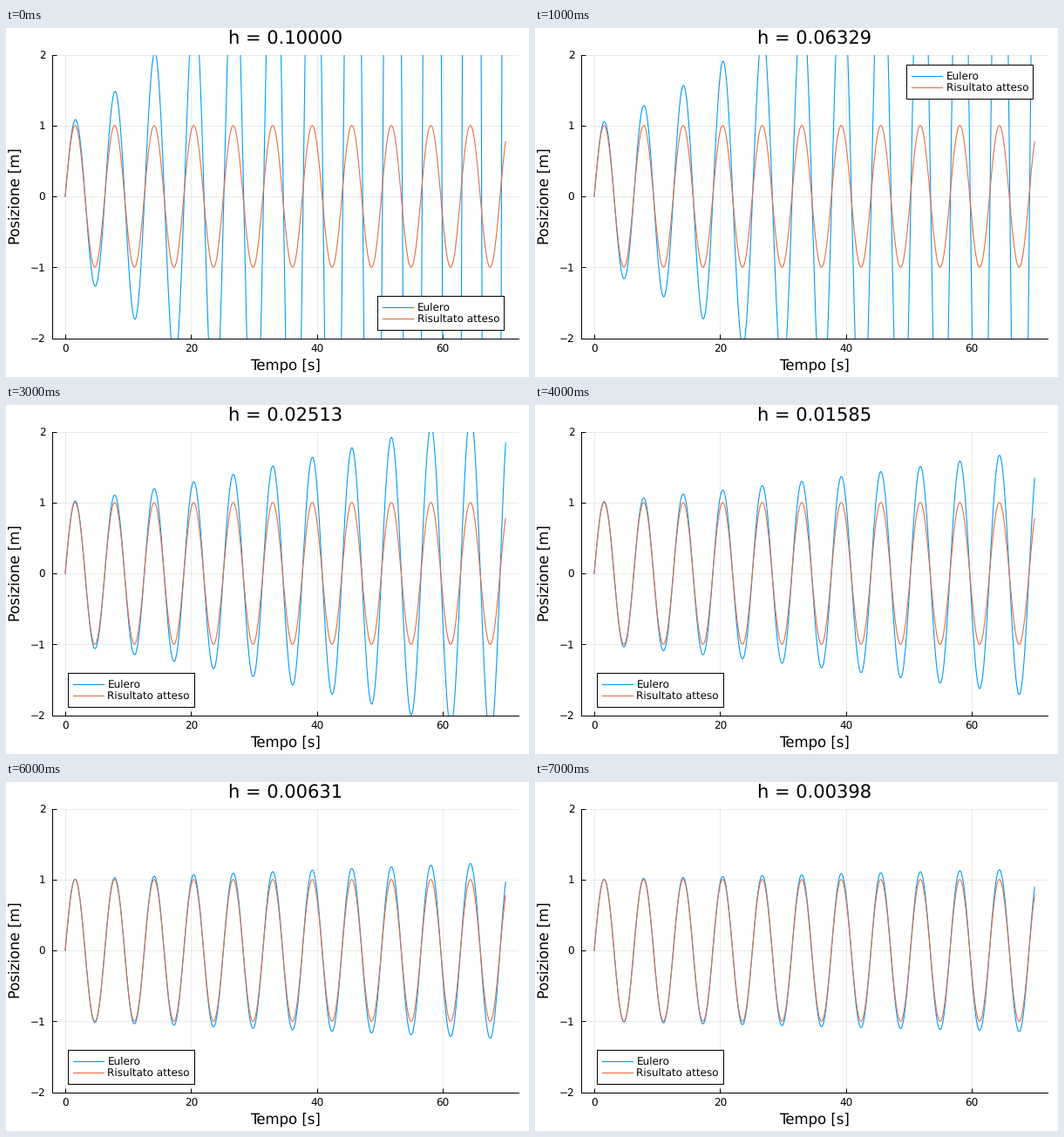
Animation of 600 by 400 pixels, one loop 8 s. Source, as a matplotlib script:

```python
import matplotlib.pyplot as plt
import numpy as np
from matplotlib.animation import FuncAnimation
from matplotlib.lines import Line2D
from matplotlib.patches import Rectangle
from matplotlib.transforms import Affine2D

W, H, DPI = 600, 400, 100
PT = 72 / DPI  # points per pixel
BLUE, RED = "#009AFA", "#E36F47"
LEFT, RIGHT, TOP, BOTTOM = 52.8, 588.3, 30.5, 355.5
T_END = 70
FRAMES = 8

plt.rcParams.update({
    "font.family": "DejaVu Sans",
    "text.hinting": "none",
    "path.simplify": False,
})

fig = plt.figure(figsize=(W / DPI, H / DPI), dpi=DPI, facecolor="white")
px = Affine2D().scale(1, -1).translate(0, H)  # pixels from the top left

ax = fig.add_axes([LEFT / W, 1 - BOTTOM / H, (RIGHT - LEFT) / W, (BOTTOM - TOP) / H])
ax.set(xlim=(-2.1, 72.1), ylim=(-2, 2), xticks=range(0, 61, 20), yticks=range(-2, 3))
ax.set_axisbelow(True)
ax.grid(color="black", alpha=0.1, lw=0.75 * PT)
ax.tick_params(direction="in", length=5 * PT, width=PT,
               labelbottom=False, labelleft=False)
ax.spines[["top", "right"]].set_visible(False)
ax.spines[["left", "bottom"]].set_linewidth(PT)


def label(x, y, text, size, transform=px, **kw):
    """Put text with its baseline at pixel (x, y)."""
    return fig.text(x, y, text, fontsize=size * PT, transform=transform,
                    va="baseline", **kw)


for t in range(0, 61, 20):
    x = LEFT + (t + 2.1) / 74.2 * (RIGHT - LEFT)
    label(x, 372, str(t), 12, ha="center")
for v in range(-2, 3):
    y = TOP + (2 - v) / 4 * (BOTTOM - TOP)
    label(45.3, y + 4.5, str(v).replace("-", "\u2212"), 12, ha="right")

label(320.5, 392, "Tempo [s]", 16.5, ha="center")
label(16.5, 193, "Posizione [m]", 16.5, ha="center",
      rotation=90, rotation_mode="anchor")
title = label(320.5, 18.3, "", 21, ha="center")

euler, = ax.plot([], [], color=BLUE, lw=1.1 * PT)
exact, = ax.plot([], [], color=RED, lw=1.1 * PT)

# The legend is drawn at the origin and moved as a whole.
shift = Affine2D()
box = shift + px
fig.add_artist(Rectangle((0, 0), 145, 39, fc="white", ec="black", lw=PT,
                         transform=box, zorder=5))
for y, color, name in ((13, BLUE, "Eulero"), (26, RED, "Risultato atteso")):
    fig.add_artist(Line2D([6, 41.5], [y, y], color=color, lw=1.1 * PT,
                          transform=box, zorder=6))
    label(46, y + 4.3, name, 12, transform=box, zorder=6)

CORNERS = {0: (425.5, 306.5), 1: (425.5, 41.5)}
BOTTOM_LEFT = (70.5, 306.5)


def update(i):
    h = 10 / round(100 * 10 ** (i / 5))
    n = np.arange(round(T_END / h) + 1)
    t = n * h
    # Closed form of explicit Euler for x'' = -x
    euler.set_data(t, (1 + h * h) ** (n / 2) * np.sin(n * np.arctan(h)))
    exact.set_data(t, np.sin(t))
    title.set_text(f"h = {h:.5f}")
    shift.clear().translate(*CORNERS.get(i, BOTTOM_LEFT))
    return euler, exact, title


anim = FuncAnimation(fig, update, frames=FRAMES, interval=1000, repeat=True)
plt.show()
```
